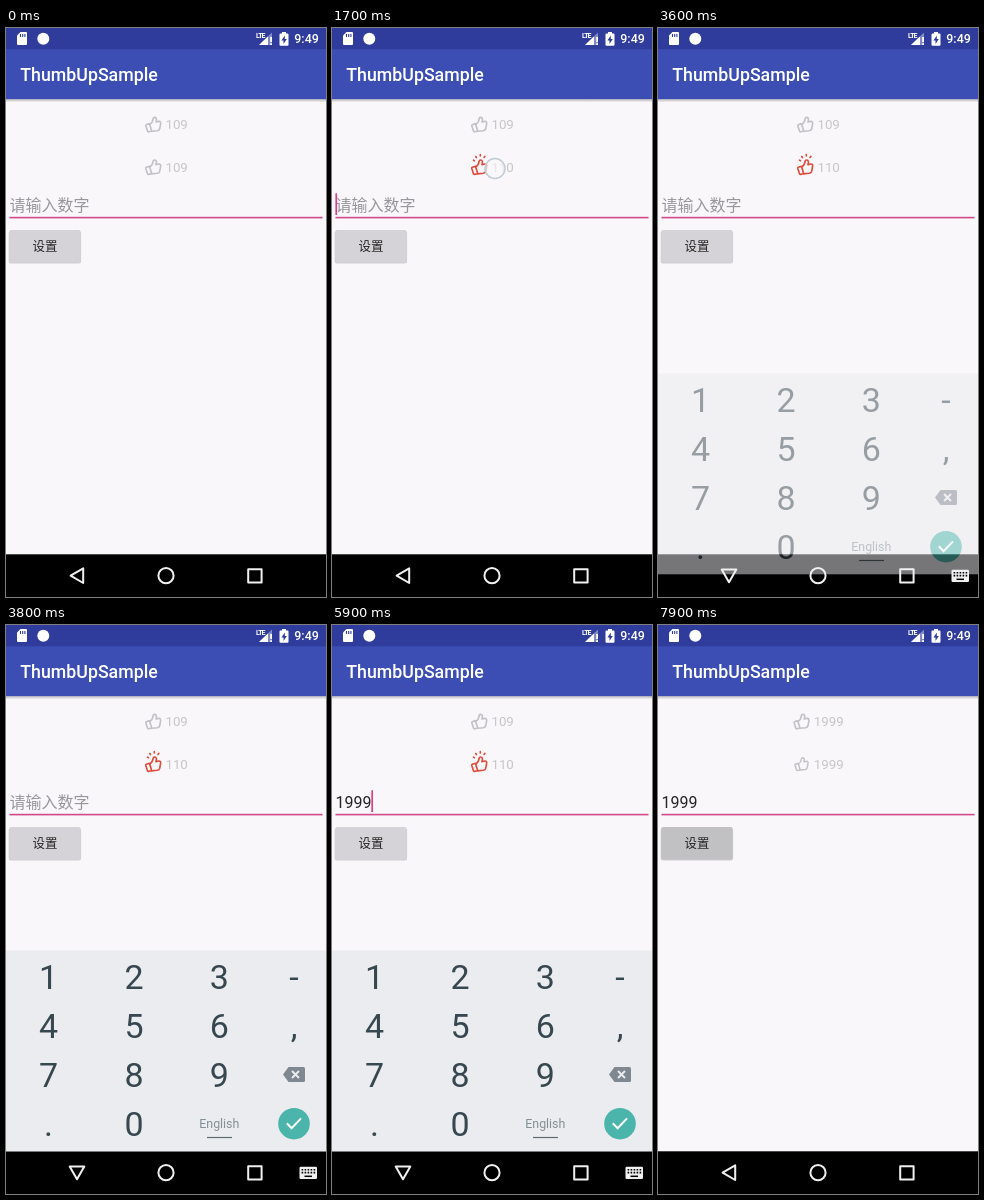
Write an HTML page that moves like this. It is 320 px wide and 569 px high and loops after 8 s.

```html
<!DOCTYPE html>
<html lang="zh">
<head>
<meta charset="utf-8">
<title>ThumbUpSample</title>
<style>
html, body { margin: 0; width: 100%; height: 100%; overflow: hidden; background: #f9f7fa; }
svg { display: block; width: 100vw; height: 100vh; }
text { font-family: Roboto, "Noto Sans CJK SC", "Noto Sans CJK", sans-serif; }
.count { font-size: 13.33px; fill: #c6c5c8; }
.thumb { fill: none; stroke-width: 1.65; stroke-linecap: round; stroke-linejoin: round; }
.keys { font-size: 34px; fill: #37474f; text-anchor: middle; }
.nav { fill: none; stroke: #f0f0f0; stroke-width: 2; stroke-linejoin: round; }
</style>
</head>
<body>
<svg viewBox="0 0 320 569">
  <defs>
    <linearGradient id="shade" x2="0" y2="1">
      <stop stop-color="#77767c" stop-opacity=".5"/>
      <stop offset="1" stop-color="#77767c" stop-opacity="0"/>
    </linearGradient>
    <g id="hand">
      <path d="M1.2 8.4 3.6 7.6Q4.3 7.4 4.6 8.2L6.3 13.8Q6.5 14.6 5.7 14.9L3.6 15.5Q2.7 15.7 2.4 14.8L.7 9.5Q.5 8.7 1.2 8.4Z"/>
      <path d="M4.7 8C7.2 6.6 7.8 4.6 8 2.4C8.2.7 10.9.6 11.3 2.7C11.5 4 11.1 4.7 10.8 5.7L13.7 5.1C15.3 4.9 15.8 6.3 15.5 7.5L14.6 12.5C14.3 13.8 13.4 14.2 12.2 14.4L6.4 15"/>
    </g>
  </defs>

  <rect width="320" height="569" fill="#f9f7fa"/>
  <rect y="71" width="320" height="3.5" fill="url(#shade)"/>
  <rect width="320" height="71.1" fill="#3c4eb4"/>
  <rect width="320" height="21.3" fill="#303c9c"/>
  <text x="14.3" y="52.9" font-size="17.78" font-weight="500" fill="#fff">ThumbUpSample</text>

  <g fill="#fff">
    <path d="M14.5 4H20Q21 4 21 5V16Q21 17 20 17H12Q11 17 11 16V7.5Z"/>
    <path d="M14.5 6V9M16.7 6V9M18.9 6V9" stroke="#303c9c" stroke-width="1.1"/>
    <circle cx="37.3" cy="10.7" r="6"/>
    <text x="250" y="10.2" font-size="7" font-weight="700" letter-spacing="-.9">LTE</text>
    <path d="M253 17 266 4.5V17Z" opacity=".4"/>
    <path d="M253 17 262 8.4V17Z"/>
    <path d="M264.2 9H266V14H264.2ZM264.2 15.2H266V17H264.2Z"/>
    <path d="M276 4H280V5.4H281.5Q282.5 5.4 282.5 6.4V16.8Q282.5 17.8 281.5 17.8H274.5Q273.5 17.8 273.5 16.8V6.4Q273.5 5.4 274.5 5.4H276Z"/>
    <path d="M278.8 7.4 275.4 12.4H277.5V16L280.8 11H278.8Z" fill="#303c9c"/>
    <text x="288.3" y="15.4" font-size="12.44" font-weight="500">9:49</text>
  </g>

  <g id="rows"></g>
  <g id="touch">
    <circle cx="163" cy="140.5" r="10" fill="#f9f7fa" fill-opacity=".65" stroke="#c3cbd3" stroke-width="1.5"/>
  </g>

  <text id="field" x="3.6" y="182.5" font-size="16"></text>
  <rect x="3.5" y="188.8" width="313" height="1.6" fill="#d2478a"/>
  <rect id="cursor" y="165.3" width="1.7" height="21.7" fill="#da3f88"/>

  <rect x="2.7" y="203" width="72.4" height="32.6" rx="2.5" fill="#a7a6aa" opacity=".5"/>
  <rect id="button" x="3.2" y="202" width="71.4" height="32.6" rx="2"/>
  <text x="39" y="222.6" font-size="12.44" font-weight="500" fill="#222" text-anchor="middle">设置</text>

  <rect y="526.3" width="320" height="43" fill="#000"/>
  <g id="keyboard">
    <rect y="325.5" width="320" height="200.8" fill="#ebecef"/>
    <g id="keys" class="keys"></g>
    <text x="213.3" y="502.5" font-size="12.4" fill="#829096" text-anchor="middle">English</text>
    <path d="M201 512.5H226" stroke="#5d6b72" stroke-width="1.2"/>
    <path d="M277 449.5 282.5 442H297.5Q299 442 299 443.5V455.5Q299 457 297.5 457H282.5Z" fill="#7f8791"/>
    <path d="M286 446 293 453M293 446 286 453" stroke="#ebecef" stroke-width="1.9"/>
    <circle cx="288" cy="498.7" r="15.8" fill="#4cb5ab"/>
    <path d="M280.8 498.3 285.6 503.2 295 493.4" fill="none" stroke="#fff" stroke-width="2"/>
  </g>
  <rect id="ripple" x="24" y="526.5" width="95" height="42.5" rx="21" fill="#dcdce6"/>
  <g class="nav">
    <path id="back"/>
    <circle cx="160" cy="547.7" r="7.6"/>
    <rect x="242.2" y="541.2" width="13.4" height="13.2"/>
  </g>
  <g id="switcher">
    <rect x="293.5" y="541.7" width="17.5" height="12.3" rx="1.2" fill="#f0f0f0"/>
    <path d="M295.6 544.7H309.5M295.6 547.6H309.5" stroke="#000" stroke-width="1.6" stroke-dasharray="1.6 1.4"/>
    <path d="M298.5 551.3H306" stroke="#000" stroke-width="1.5"/>
  </g>
</svg>
<script>
const LOOP = 8000, STEP = 100;
const GREY = '#c2c1c5', RED = '#df4b3b';
const DIGIT = 7.49;
const $ = id => document.getElementById(id);
const within = (t, from, to) => t >= from && t < to;
const during = (t, spans) => spans.some(([from, to]) => within(t, from, to));
const show = (id, on) => $(id).setAttribute('visibility', on ? 'visible' : 'hidden');

// Linear interpolation through [time, value] points.
function track(t, points) {
  const next = points.findIndex(p => p[0] > t);
  if (next === 0) return points[0][1];
  if (next < 0) return points[points.length - 1][1];
  const [t0, a] = points[next - 1], [t1, b] = points[next];
  return a + (b - a) * (t - t0) / (t1 - t0);
}

const columns = [42.6, 128, 213.4, 288];
$('keys').innerHTML = ['123-', '456,', '789 ', '.0  '].map((row, r) =>
  [...row].map((key, c) => `<text x="${columns[c]}" y="${364 + 48.9 * r}">${key}</text>`).join('')
).join('');

function thumb(x, y, color, scale) {
  return `<use href="#hand" class="thumb" stroke="${color}"
    transform="translate(${x + 8} ${y + 8}) scale(${scale}) translate(-8 -8)"/>`;
}

function shine(x, y, amount) {
  return `<path class="thumb" stroke="${RED}" opacity="${amount}" transform="translate(${x} ${y})"
    d="M2.4 1.2 3.3 1.8M4.7-2.4 5.3-1.3M9.2-4.2V-3M13.8-2.6 12.9-1.5"/>`;
}

// Two final digits roll upwards or downwards as the like is toggled.
function rolling(x, y, liked) {
  const digit = (text, shift, alpha) =>
    `<text class="count" x="${x + DIGIT}" y="${y + shift}" opacity="${alpha}">${text}</text>`;
  return `<text class="count" x="${x}" y="${y}">1</text>`
    + digit('09', -12 * liked, 1 - liked) + digit('10', 12 * (1 - liked), liked);
}

const count = (x, y, text) => `<text class="count" x="${x}" y="${y}">${text}</text>`;

function drawRows(t) {
  const changed = t >= 7700;
  const iconX = changed ? 135.4 : 139.1, textX = changed ? 155.7 : 159.4;
  const liked = changed ? 0 : track(t, [[1200, 0], [1500, 1], [1700, 1], [2000, 0], [2900, 0], [3100, 1]]);
  const scale = changed ? .88 : track(t, [
    [900, 1], [1000, .88], [1200, .88], [1400, 1], [1700, 1], [1800, .9], [2000, 1],
    [2700, 1], [2800, .88], [2900, .88], [3100, 1]
  ]);
  const red = during(t, [[1300, 1800], [3000, 7700]]);
  $('rows').innerHTML =
    thumb(iconX, 88.3, GREY, 1) + count(textX, 101.3, changed ? '1999' : '109')
    + thumb(iconX, 130.9, red ? RED : GREY, scale)
    + (red ? shine(iconX, 130.9, liked) : '')
    + (changed ? count(textX, 143.9, '1999') : rolling(textX, 143.9, liked));
}

function drawField(t) {
  const typed = '1999'.slice(0, t < 4300 ? 0 : Math.min(4, 1 + Math.floor((t - 4300) / 200)));
  $('field').textContent = typed || '请输入数字';
  $('field').setAttribute('fill', typed ? '#252527' : '#98979b');
  $('cursor').setAttribute('x', 3.4 + typed.length * 8.98);
  show('cursor', during(t, [[500, 1000], [1500, 2000], [2500, 3000], [4300, 5400], [5900, 6400], [6900, 7400]]));
}

function drawKeyboard(t) {
  const alpha = track(t, [[3400, 0], [3600, .5], [3800, 1], [6600, 1], [6700, .75], [6800, .37], [6900, 0]]);
  $('keyboard').setAttribute('opacity', alpha);
  $('keyboard').setAttribute('transform', `translate(0 ${40 * (1 - alpha)})`);
  const open = within(t, 3600, 6700);
  show('switcher', open);
  $('back').setAttribute('d', open ? 'M63.7 541.5H78.3L71 554.2Z' : 'M64.6 547.7 77.2 540.4V555Z');
  $('ripple').setAttribute('opacity', track(t, [[6500, 0], [6700, .1], [6800, .1], [7100, 0]]));
}

function render(time) {
  const t = Math.floor(time % LOOP / STEP) * STEP;
  drawRows(t);
  drawField(t);
  drawKeyboard(t);
  show('touch', during(t, [[900, 1000], [1700, 1800], [2600, 2800]]));
  $('button').setAttribute('fill', t >= 7900 ? '#c1c0c3' : t >= 7600 ? '#cbcacd' : '#d5d3d7');
}

const start = performance.now();
function frame() {
  render(performance.now() - start);
  requestAnimationFrame(frame);
}
frame();
</script>
</body>
</html>
```
